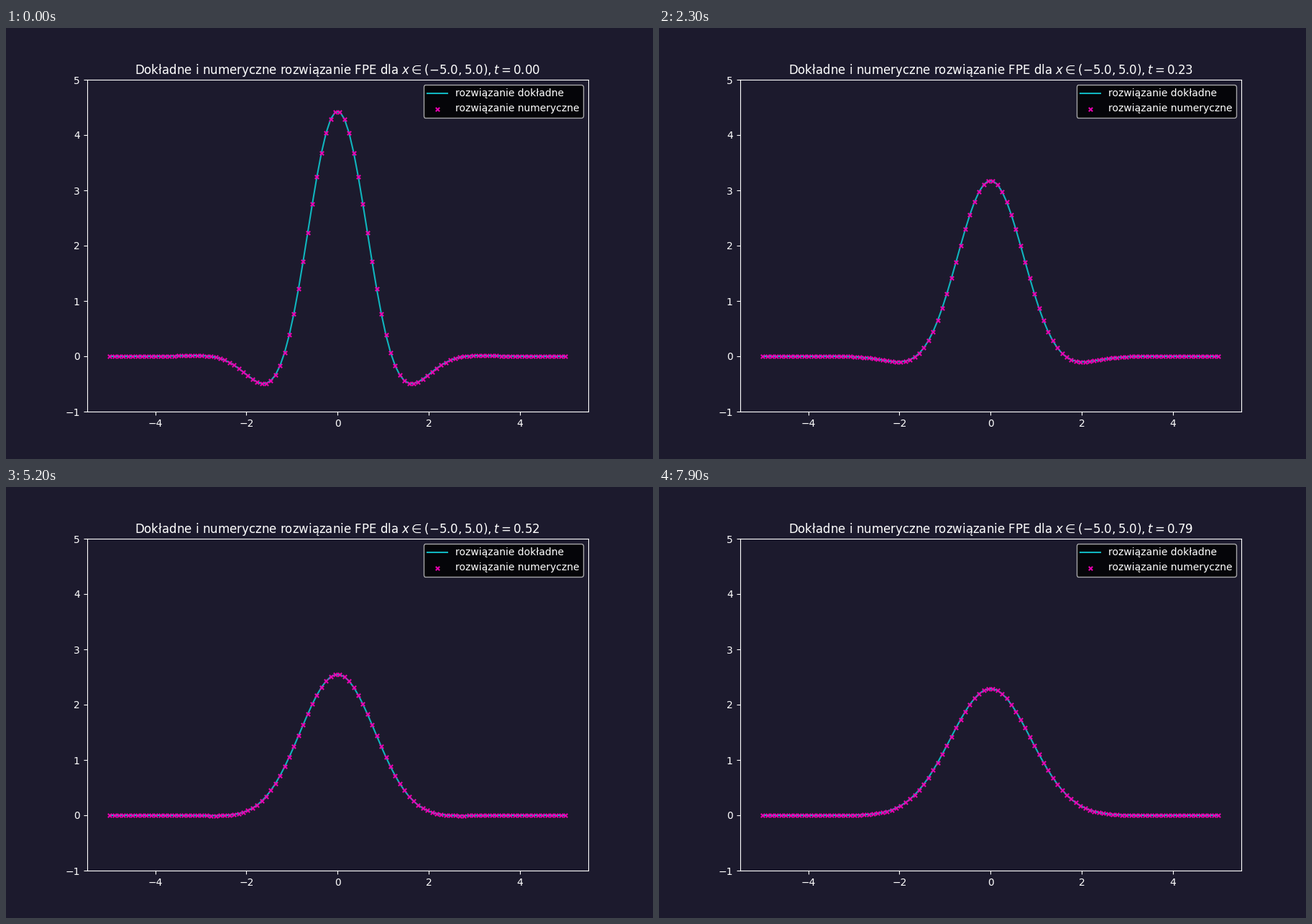
A matplotlib script that plays this animation: 900 px wide and 600 px high, repeating every 8000 ms.

```python
import numpy as np
import matplotlib.pyplot as plt
from matplotlib.animation import FuncAnimation

BG = "#1c1a2d"
CYAN = "#10b5be"
PINK = "#e800b0"
FRAMES, INTERVAL, DT = 80, 100, 0.01
K = np.pi / 2

plt.style.use("dark_background")
plt.rcParams["font.family"] = "DejaVu Sans"

x = np.linspace(-5, 5, 100)


def density(t):
    """Solution of u_t = (x u)_x + u_xx: stationary Gaussian plus a decaying cosine."""
    decay = np.exp(-t)
    wave = np.exp((K * decay) ** 2 / 2) * np.cos(K * decay * x)
    return np.exp(-x**2 / 2) * (1 + wave)


def heading(t):
    return ("Dokładne i numeryczne rozwiązanie FPE dla "
            rf"$x \in (-5.0, 5.0), t = {t:.2f}$")


fig, ax = plt.subplots(figsize=(9, 6), dpi=100, facecolor=BG)
ax.set_facecolor(BG)
ax.set_xlim(-5.5, 5.5)
ax.set_ylim(-1, 5)

line, = ax.plot(x, density(0), color=CYAN, lw=1.5, label="rozwiązanie dokładne")
dots = ax.scatter(x, density(0), s=15, marker="x", color=PINK, zorder=3,
                  label="rozwiązanie numeryczne")
title = ax.set_title(heading(0))
ax.legend(loc="upper right")


def update(i):
    t = i * DT
    u = density(t)
    line.set_ydata(u)
    dots.set_offsets(np.column_stack([x, u]))
    title.set_text(heading(t))
    return line, dots, title


anim = FuncAnimation(fig, update, frames=FRAMES, interval=INTERVAL,
                     repeat=True, repeat_delay=0)
plt.show()
```
